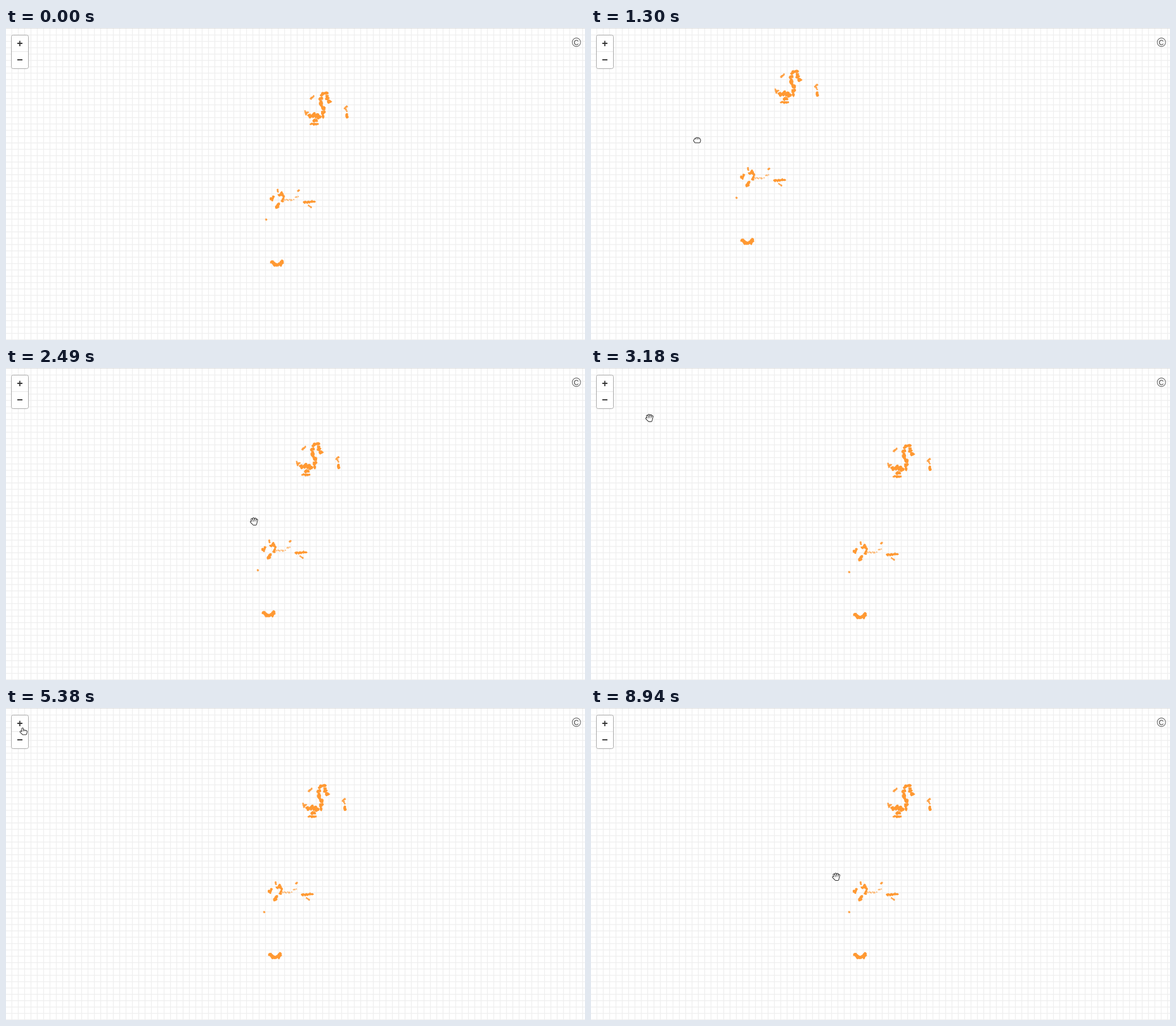
An HTML page with a canvas for the animation above (9.65 s loop, 1020 px wide and 549 px high).

```html
<!DOCTYPE html>
<html lang="en">
<head>
<meta charset="utf-8">
<title>Map panning</title>
<style>
  html, body { margin: 0; width: 100%; height: 100%; overflow: hidden; background: #fff; }
  canvas { display: block; width: 1020px; height: 549px; }
</style>
</head>
<body>
<canvas id="stage" width="1020" height="549"></canvas>
<script>
const ctx = document.getElementById('stage').getContext('2d');
const W = 1020, H = 549, LOOP = 9650;
const ORANGE = '#ff9933';

const lerp = (a, b, u) => a + (b - a) * u;
const mix = (p, q, u) => [lerp(p[0], q[0], u), lerp(p[1], q[1], u)];
const linear = u => u;
const easeIn = u => u * u;
const easeOut = u => 1 - (1 - u) ** 2;
const smooth = u => u * u * (3 - 2 * u);
const glide = u => 1 - (1 - u) ** 4;

let seed = 11;
function random() {
  seed = (seed * 16807) % 2147483647;
  return seed / 2147483647;
}
const jitter = amount => (random() * 2 - 1) * amount;

function addPatch(path, x, y, rx, ry) {
  const sides = 8;
  for (let i = 0; i < sides; i++) {
    const angle = i * Math.PI * 2 / sides;
    const reach = 1 + jitter(0.3);
    const point = [x + Math.cos(angle) * rx * reach, y + Math.sin(angle) * ry * reach];
    i ? path.lineTo(...point) : path.moveTo(...point);
  }
  path.closePath();
}

// Scatters irregular patches along a polyline.
function trail(size, count, spread, ...points) {
  const path = new Path2D();
  for (let i = 0; i < count; i++) {
    const place = (i + 0.5) / count * (points.length - 1);
    const leg = Math.floor(place);
    const [x, y] = mix(points[leg], points[leg + 1], place - leg);
    addPatch(path, x + jitter(spread), y + jitter(spread),
      size * (1 + jitter(0.3)), size * (1 + jitter(0.3)));
  }
  return { path, alpha: size < 2 ? 0.5 : size < 3 ? 0.8 : 1 };
}

// Places are those of the larger zoom level.
const trails = [
  trail(5, 9, 3, [594, 3], [607, -10], [613, 14], [623, 27]),
  trail(5, 12, 3, [592, 8], [590, 32], [603, 46], [598, 76]),
  trail(5, 15, 4, [548, 76], [568, 68], [584, 76], [564, 95]),
  trail(3, 6, 2, [553, 101], [583, 102]),
  trail(2.5, 7, 2, [537, 53], [538, 70], [547, 58]),
  trail(2.5, 4, 1, [554, 14], [567, 3]),
  trail(2.5, 6, 2, [685, 40], [676, 44], [683, 60]),
  trail(4, 4, 1, [683, 68], [683, 79]),

  trail(3, 7, 1, [425, 356], [419, 369], [415, 361]),
  trail(2, 4, 1, [439, 331], [440, 342]),
  trail(3.5, 13, 2, [443, 355], [454, 346], [459, 354], [458, 374]),
  trail(4, 7, 2, [444, 380], [441, 388], [433, 396]),
  trail(2.5, 3, 1, [515, 334], [510, 338]),
  trail(1.4, 14, 4, [467, 367], [485, 370], [515, 355]),
  trail(3.2, 11, 1.5, [530, 377], [569, 376]),
  trail(2, 4, 1, [547, 387], [558, 396]),
  trail(2.4, 2, 0.5, [397, 438], [399, 438]),

  trail(5, 14, 1.5, [419, 588], [428, 595], [450, 596], [457, 584])
];

// Each key: time, place, easing of the move that ends there.
function along(keys, t) {
  const next = keys.findIndex(([time]) => t < time);
  if (next === 0) return keys[0][1];
  if (next < 0) return keys[keys.length - 1][1];
  const [start, from] = keys[next - 1];
  const [end, to, ease] = keys[next];
  return mix(from, to, ease((t - start) / (end - start)));
}

const home = [0, 0], panned = [-215.5, -40], settled = [-3.5, 22];
const panKeys = [
  [800, home], [900, [-20, -12.3], easeIn], [1000, [-93, -24], linear], [1710, panned, glide],
  [2070, panned, linear], [2290, [-108, -8], easeIn], [2760, settled, glide]
];

const release = [187, 197], dropped = [437, 270], corner = [51, 52];
const plus = [31, 41], minus = [24, 60];
const cursorKeys = [
  [470, [420, 320]], [800, [281, 221], easeOut], [900, [261, 209], easeIn],
  [1000, release, linear], [1910, release, linear], [2070, [330, 238], smooth],
  [2290, dropped, easeIn], [2720, dropped, linear], [3180, [103, 88], smooth],
  [3460, corner, easeOut], [3680, corner, linear], [4040, plus, smooth],
  [6110, plus, linear], [6250, minus, smooth], [8700, minus, linear],
  [8940, [432, 297], smooth]
];

const cursors = {
  open: new Path2D('M-2.5 1L-4-3.6M-.3 0L-1-5M1.9 0L2.4-4.7M3.9 1L5-2.6M-2 4L-5.2 .6M-2 1.5H4L3 5H-1Z'),
  fist: new Path2D('M-3.4 0V-1.6M-1 0V-2.8M1.5 0V-2.8M3.8 0V-1.8M-5 1V1.2M-4.5 .5H4.8L4 3.5H-3.5Z'),
  pointer: new Path2D('M-1.8 1V-4.6M.6 1V-1M2.8 1V-.6M4.8 1V.2M-2 3.5L-5 .8M-2 1.5H4.8L4 4.5H-1.5Z')
};

function cursorKind(t) {
  if ((t >= 800 && t < 1490) || (t >= 2030 && t < 2330)) return 'fist';
  return t >= 3780 && t < 8780 ? 'pointer' : 'open';
}

function drawGrid() {
  const step = 11.17;
  ctx.fillStyle = '#fff';
  ctx.fillRect(0, 0, W, H);
  ctx.fillStyle = '#efefef';
  for (let x = 9.7; x < W; x += step) ctx.fillRect(x, 0, 1.4, H);
  for (let y = 11.7; y < H; y += step) ctx.fillRect(0, y, W, 1.4);
  ctx.fillStyle = '#dcdcdc';
  ctx.fillRect(0, 0, W, 1);
}

function drawMap(t) {
  const zoomed = t >= 5520 && t < 7740;
  const scale = zoomed ? 1 : 0.5;
  const [x, y] = along(panKeys, t);
  ctx.save();
  ctx.beginPath();
  ctx.rect(0, 1, W, H);
  ctx.clip();
  if (!zoomed) ctx.translate(259 + x, 118 + y);
  ctx.scale(scale, scale);
  ctx.fillStyle = ctx.strokeStyle = ORANGE;
  ctx.lineWidth = (zoomed ? 0.4 : 1.2) / scale;
  for (const { path, alpha } of trails) {
    ctx.globalAlpha = alpha;
    ctx.fill(path);
    ctx.stroke(path);
  }
  ctx.restore();
}

function drawControls() {
  ctx.beginPath();
  ctx.roundRect(9.5, 12.5, 30, 59, 3);
  ctx.fillStyle = '#fff';
  ctx.fill();
  ctx.strokeStyle = '#a3a3a3';
  ctx.lineWidth = 1;
  ctx.stroke();
  ctx.fillStyle = '#e6e6e6';
  ctx.fillRect(10, 41, 29, 1);

  ctx.textAlign = 'center';
  ctx.fillStyle = '#333';
  ctx.font = 'bold 18px "Liberation Mono", monospace';
  ctx.fillText('+', 24.5, 33);
  ctx.fillText('−', 24.5, 62);
  ctx.fillStyle = '#555';
  ctx.font = '22px "Liberation Sans", sans-serif';
  ctx.fillText('©', 1004.8, 32.7);
}

function drawCursor(t) {
  if (t < 470) return;
  const hand = cursors[cursorKind(t)];
  const [x, y] = along(cursorKeys, t);
  ctx.save();
  ctx.translate(Math.round(x), Math.round(y));
  ctx.lineCap = ctx.lineJoin = 'round';
  ctx.lineWidth = 3.8;
  ctx.strokeStyle = '#222';
  ctx.stroke(hand);
  ctx.lineWidth = 1.8;
  ctx.strokeStyle = ctx.fillStyle = '#fff';
  ctx.stroke(hand);
  ctx.fill(hand);
  ctx.restore();
}

const start = performance.now();
function frame() {
  const t = (performance.now() - start) % LOOP;
  drawGrid();
  drawMap(t);
  drawControls();
  drawCursor(t);
  requestAnimationFrame(frame);
}
frame();
</script>
</body>
</html>
```
